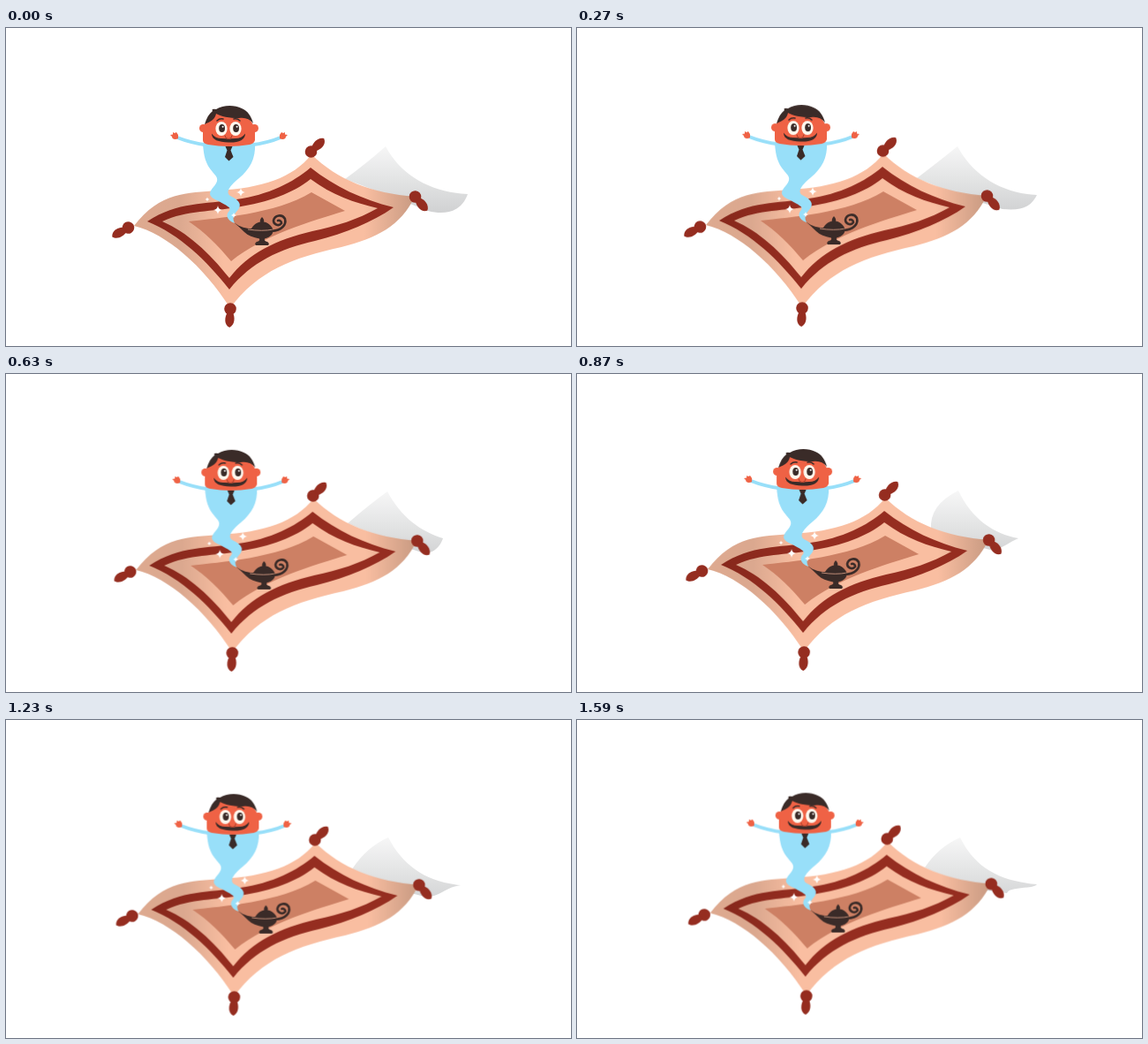
These frames come from a looping animation (640 by 360 pixels, 1620 ms). An HTML page without scripts:

```html
<!DOCTYPE html>
<html lang="en">
<head>
<meta charset="utf-8">
<title>Flying carpet</title>
<style>
  html, body { margin: 0; width: 100%; height: 100%; overflow: hidden; background: #fff; }
  svg { display: block; width: 100%; height: 100%; }
  .dark { fill: #3a2b28; }
  .maroon { fill: #952d20; }
  .skin { fill: #ef6245; }
  .blue { fill: #98dff9; }
  .line { fill: none; stroke: #3a2b28; stroke-linecap: round; }
  .arm { fill: none; stroke: #98dff9; stroke-width: 4; }
  .rider { animation: drift 1620ms linear infinite; }
  @keyframes drift { to { transform: translate(5.8px, -5.6px); } }
</style>
</head>
<body>
<svg viewBox="0 0 640 360">
  <defs>
    <linearGradient id="wool" gradientUnits="userSpaceOnUse" x1="145" y1="0" x2="463" y2="0">
      <stop offset="0" stop-color="#deaa90"/>
      <stop offset=".16" stop-color="#dba88f"/>
      <stop offset=".32" stop-color="#f9bea1"/>
      <stop offset=".82" stop-color="#f9bea1"/>
      <stop offset="1" stop-color="#c89a82"/>
    </linearGradient>
    <linearGradient id="border" gradientUnits="userSpaceOnUse" x1="160" y1="0" x2="250" y2="0">
      <stop offset="0" stop-color="#87281c"/>
      <stop offset="1" stop-color="#952d20"/>
    </linearGradient>
    <linearGradient id="veil" gradientUnits="userSpaceOnUse" x1="0" y1="134" x2="0" y2="212">
      <stop offset="0" stop-color="#f6f6f6"/>
      <stop offset="1" stop-color="#cfd0d1"/>
    </linearGradient>
    <g id="tassel" class="maroon">
      <circle r="6.8"/>
      <path d="M-3 4C-6 9-7 18 0 21C6 18 6 9 3 4Z"/>
    </g>
    <path id="star" d="M0-5Q.6-.6 5 0Q.6.6 0 5Q-.6.6-5 0Q-.6-.6 0-5Z" fill="#fff"/>
    <g id="eye">
      <ellipse rx="6.6" ry="8" fill="#fff8ee"/>
      <ellipse cx=".6" cy="-.6" rx="3.4" ry="4.5" class="dark"/>
      <circle cx="1.6" cy="-2.2" r="1" fill="#fff"/>
    </g>
    <path id="hand" class="skin" d="M4 3C1 5-3 4-3 1L-5-1L-2-1.500L-2-4L0-3L2-4L4-1Z"/>
  </defs>

  <path fill="url(#veil)">
    <animate attributeName="d" dur="1620ms" repeatCount="indefinite"
      keyTimes="0;.167;.278;.389;.537;.759;.981;1"
      values="M384 171Q410 152 430 134C447 166 480 186 523 188C517 206 500 213 478 207L440 192Z;
              M385 170Q410 151 431 134C448 166 480 187 521 189C514 203 504 207 482 205L440 192Z;
              M386 169Q410 150 431 134C448 165 472 183 508 190C495 198 482 224 455 220L430 212Z;
              M387 169Q410 149 432 133C448 163 470 178 495 186C492 195 485 203 474 203L440 192Z;
              M401 176Q399 148 432 132C447 164 472 181 500 186C490 190 482 197 472 200L440 192Z;
              M392 169Q408 144 433 133C450 165 475 183 515 187C495 190 492 201 474 200L440 191Z;
              M394 167Q409 144 434 133C450 165 475 182 521 186C517 192 490 188 487 196L440 190Z;
              M394 167Q409 144 434 133C450 165 475 182 521 186C517 192 490 188 487 196L440 190Z"/>
  </path>

  <g class="rider">
    <g id="carpet">
      <path fill="url(#wool)" d="M145 224C175 185 205 187 240 184C290 181 325 170 346 143C375 172 415 187 463 191C447 224 420 238 380 248C325 260 285 275 254 317C223 269 182 233 145 224Z"/>
      <path fill="url(#border)" fill-rule="evenodd" d="M160 219C195 196 225 200 261 194C297 189 325 175 345 158C373 180 403 194 439 203C415 220 385 232 350 241C310 250 278 265 253 296C227 263 197 234 160 219ZM177 219C205 206 235 208 261 203C298 197 325 187 345 171C369 189 395 198 421 204C398 217 375 224 347 230C305 240 275 255 253 283C230 254 205 231 177 219Z"/>
      <path fill="#cd8064" d="M207 219C240 215 305 211 346 186L384 207C345 219 292 234 255 264C240 246 225 231 207 219Z"/>
      <use href="#tassel" transform="translate(254 318)rotate(2)"/>
      <use href="#tassel" transform="translate(138.500 226)rotate(60)"/>
      <use href="#tassel" transform="translate(345.500 140)rotate(-135)"/>
      <use href="#tassel" transform="translate(463.500 191)rotate(-41)"/>
    </g>

    <g id="lamp">
      <path class="dark" d="M258 220C266 226 272 227 278 227C281 222 285 220 288 219.500Q287 217 290 214Q293 217 292 219.500C296 220 300 223 302 227C304 233 299 237 293 238.500Q292 241 296 242Q299 244 297 246H283Q281 244 284 242Q288 241 287 238.500C280 237 274 235 270 231Q264 225 258 220Z"/>
      <path d="M274 228Q290 230.500 303 228" fill="none" stroke="#c08d78" stroke-width="1"/>
      <path class="line" stroke-width="2.600" d="M301 230C312 229 318 223 316 216A7 7 0 0 0 303 218A5 5 0 0 0 312 221A3 3 0 0 0 308 218"/>
    </g>

    <g id="genie">
      <path class="arm" d="M194 124Q209 130 228 132.500M311 124Q297 130 277 132.500"/>
      <use href="#hand" transform="translate(191 122)"/>
      <use href="#hand" transform="translate(314 122)scale(-1 1)"/>
      <path class="blue" d="M223 131H282C283 148 276 160 264 170C254 178 248 186 254 190C262 194 267 198 264 204C260 210 255 213 259 221C249 217 249 211 253 207C256 203 249 201 241 196C229 191 229 187 235 180C243 171 238 168 234 163C226 154 224 145 223 131Z"/>
      <circle class="skin" cx="223.500" cy="113.500" r="4.500"/>
      <circle class="skin" cx="281.500" cy="113.500" r="4.500"/>
      <path class="skin" d="M223 118C224 103 237 93 252 93S281 103 282 118V127Q281 131 276 132Q252 136 229 132Q223 131 223 127Z"/>
      <path class="dark" d="M225 109C227 102 230 97 234 94Q232 91 238 92C246 87 259 87 267 91C274 94 278 100 280 108C276 103 271 101 264 102C253 102 243 100 238 97C237 103 232 106 225 109Z"/>
      <path class="line" stroke-width="1.500" d="M239 105Q242 102 246 103M258 103Q262 102 265 105"/>
      <use href="#eye" x="244" y="114"/>
      <use href="#eye" x="260" y="114"/>
      <path class="dark" d="M233 119.500Q237 125 244 125T252 126Q255 125 260 125Q267 125 271 119.500C271 127 263 130 252 129.500S233 127 233 119.500Z"/>
      <path d="M248 121.500A4 4 0 0 0 256 121.500" fill="#ef6245" stroke="#a83f2b"/>
      <path class="dark" d="M248.500 134H256.500L254.500 138.500L257.500 146L252.500 150.500L248 146L250.500 138.500Z"/>
    </g>

    <use href="#star" x="266" y="186"/>
    <use href="#star" x="240" y="206"/>
    <use href="#star" transform="translate(228 194)scale(.5)"/>
    <use href="#star" transform="translate(258 212)scale(.6)"/>
  </g>
</svg>
</body>
</html>
```
